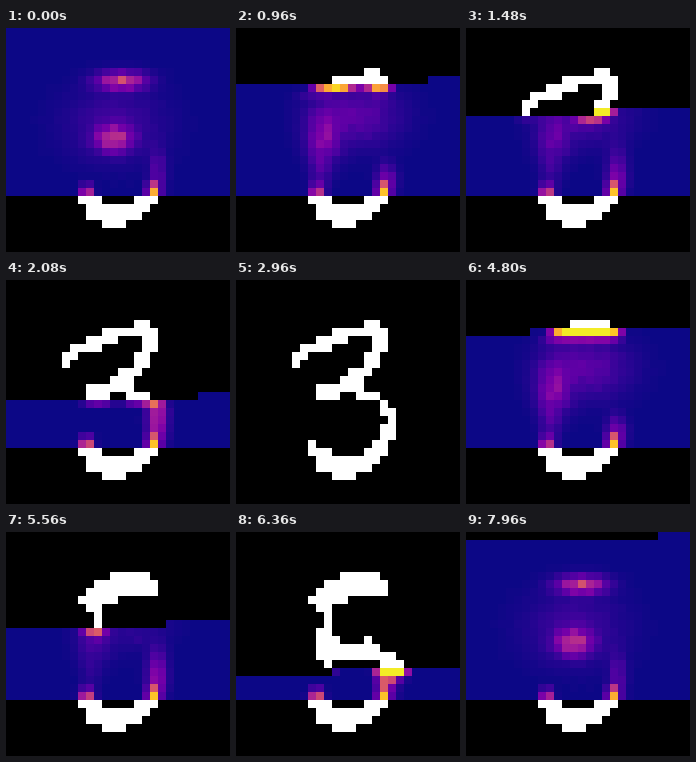
Recreate the animation shown at these times as a matplotlib script. Size 224 by 224 pixels, loop 8 s.

```python
import numpy as np
import matplotlib.pyplot as plt
from matplotlib.animation import FuncAnimation

SIZE = 28
HIDDEN = 21 * SIZE      # pixels to sample; the rows below are given
PER_FRAME = 8
CYCLE = 98              # 74 sampling frames, then a hold

ROWS, COLS = np.mgrid[:SIZE, :SIZE]
ORDER = ROWS * SIZE + COLS

# Pen paths through the grid as (column, row) points
BOWL = [(9, 20.1), (9.3, 20.8), (10.7, 21.4), (10.5, 22.5), (12.5, 23.4),
        (13.5, 23.4), (16, 22.5), (17.3, 21.3), (16, 21.75), (11.2, 22.2)]
HOOK = [(7, 9.6), (8.5, 8.3), (12.5, 6.6), (14.5, 6), (17, 5.5), (17.6, 7),
        (17.2, 8.3), (16.3, 10), (14.6, 11.3), (13.6, 12.4), (12, 13.4),
        (10.4, 13.5)]
LOBE = [(14.8, 13), (16, 14), (17, 14), (18, 15), (18.6, 16.2), (18.9, 17.2),
        (18.5, 18.4), (18.4, 19), (17.4, 20.2)]
CAP = [(13.5, 5.4), (17, 5.4), (17.5, 6.5), (11.4, 6.5), (10.2, 7.6), (9.4, 8),
       (12.6, 7.9), (10.6, 8.6), (11, 10), (11, 11), (10.6, 12.4), (10.7, 13.5),
       (11.5, 13.5)]
BELLY = [(10.5, 14.5), (11, 15.6), (11.5, 14.5), (16, 14.5), (16, 13.6),
         (16.6, 14.5), (18.5, 15.5), (19.5, 16.5), (18.6, 17.4), (18.3, 18.5),
         (17.5, 20)]


def stroke(points, radius):
    """Cells whose centre lies within the radius of the path."""
    ink = np.zeros((SIZE, SIZE), bool)
    for (x0, y0), (x1, y1) in zip(points, points[1:]):
        dx, dy = x1 - x0, y1 - y0
        t = ((COLS - x0) * dx + (ROWS - y0) * dy) / (dx * dx + dy * dy)
        t = np.clip(t, 0, 1)
        ink |= np.hypot(COLS - x0 - t * dx, ROWS - y0 - t * dy) < radius
    return ink


def digit(upper, lower, lower_radius):
    ink = stroke(BOWL, 0.78) | stroke(upper, 0.78) | stroke(lower, lower_radius)
    return ink.astype(float)


def blob(row, col, row_spread, col_spread, height):
    return height * np.exp(-((ROWS - row) / row_spread) ** 2 / 2
                           - ((COLS - col) / col_spread) ** 2 / 2)


def smooth(n, start, end):
    t = np.clip((n - start) / (end - start), 0, 1)
    return t * t * (3 - 2 * t)


DIGITS = [digit(HOOK, LOBE, 0.68), digit(CAP, BELLY, 0.78)]

# Heat left by the bowl's two ends, and the guesses made above them
GRAIN = np.random.default_rng(4).uniform(0.85, 1.15, (SIZE, SIZE))
ENDS = blob(20, 9.6, 0.6, 0.5, 0.5) + blob(20, 17.9, 0.8, 0.5, 0.78)
PRIOR = ENDS + GRAIN * (
    blob(6.1, 14, 0.75, 2, 0.46) + blob(13.3, 13, 1.1, 1.5, 0.42)
    + blob(11.5, 13, 3, 4, 0.09) + blob(17.5, 18.5, 2, 0.7, 0.14))
MIDDLE = ENDS + GRAIN * (
    blob(13.2, 10.4, 2.2, 1.4, 0.24) + blob(10.5, 14.5, 2.4, 3.5, 0.16)
    + blob(18.5, 18.3, 1.3, 0.8, 0.22) + blob(18, 10, 2, 0.8, 0.1))
LATE = ENDS + blob(17, 18.4, 2, 0.8, 0.38) + blob(20, 9.5, 0.6, 0.6, 0.2)


def evidence(truth):
    """Sideways blur of each row, mixed with the row above it."""
    mixed = 0.8 * truth + 0.2 * np.roll(truth, 1, axis=0)
    sides = np.roll(mixed, 1, axis=1) + np.roll(mixed, -1, axis=1)
    return 0.7 * mixed + 0.3 * sides


def probability(truth, n):
    started = smooth(n, 136, 176)
    belief = PRIOR + started * (MIDDLE - PRIOR)
    belief = belief + smooth(n, 230, 400) * (LATE - belief)
    nearness = np.exp(-2.5 * np.maximum(ROWS - n / SIZE, 0))
    return np.clip(belief + started * nearness * evidence(truth), 0, 0.97)


def picture(frame):
    truth = DIGITS[frame // CYCLE % 2]
    n = min(frame % CYCLE * PER_FRAME, HIDDEN)
    colors = plt.cm.plasma(probability(truth, n))[..., :3]
    known = (ORDER < n) | (ORDER >= HIDDEN)
    colors[known] = truth[known][:, None]
    return colors


fig = plt.figure(figsize=(4, 4), dpi=56, facecolor="black")
ax = fig.add_axes([0, 0, 1, 1])
ax.axis("off")
image = ax.imshow(picture(0), interpolation="nearest", aspect="auto")


def update(frame):
    image.set_data(picture(frame))
    return [image]


anim = FuncAnimation(fig, update, frames=200, interval=40, repeat=True, repeat_delay=0)
plt.show()
```
